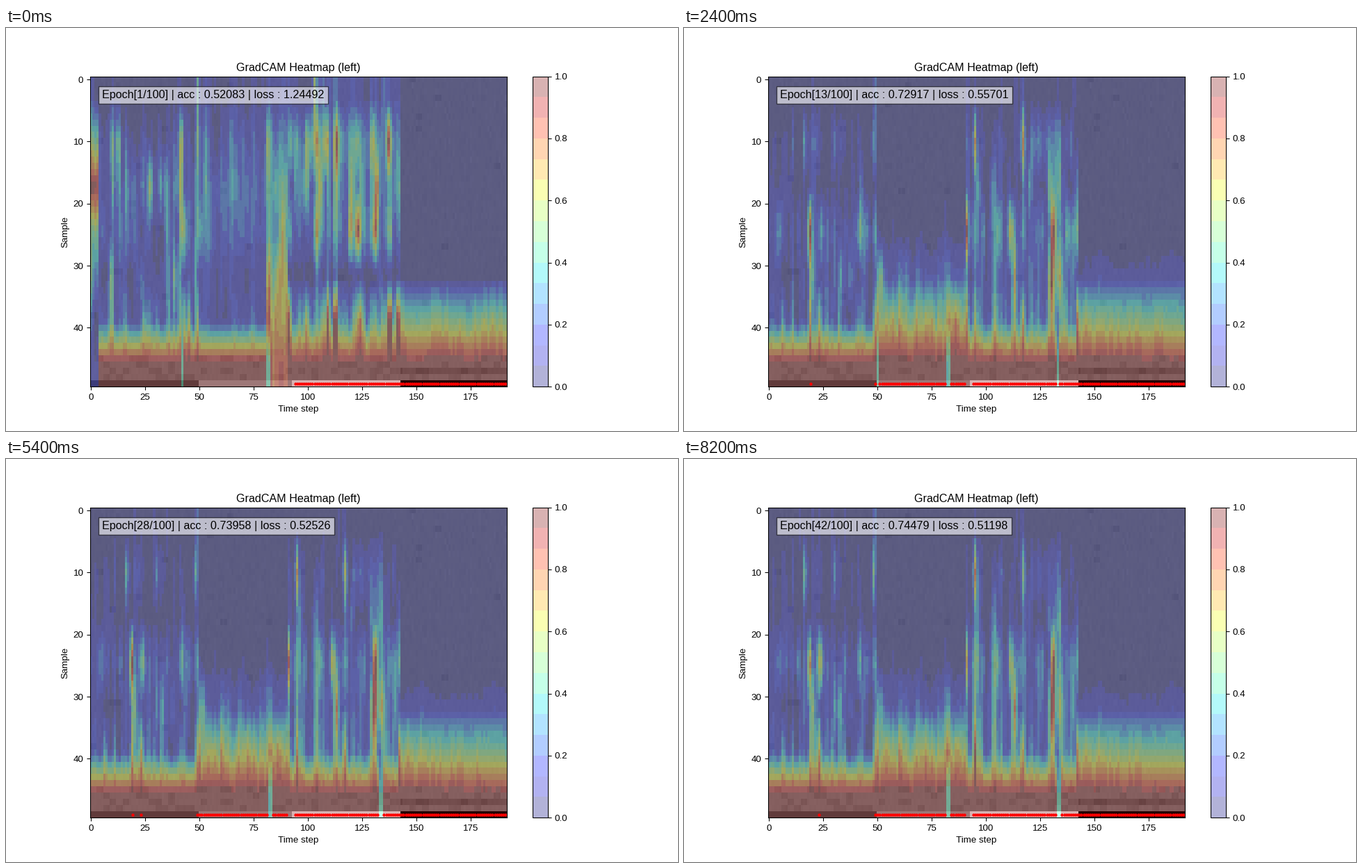
Write a matplotlib script that moves like this. It is 966x580 px and loops after 8400 ms.

```python
import numpy as np
import matplotlib.pyplot as plt
from matplotlib.animation import FuncAnimation

plt.rcParams["font.family"] = "Liberation Sans"

ROWS, COLS, CELLS, FRAMES = 50, 192, 7, 42
DPI = 96.6

# Training log: epoch, correct samples, loss
EPOCHS = (1, 6, 10, 17, 24, 32, 42)
HITS = (100, 143, 138, 142, 143, 141, 143)
LOSS = (1.24492, 0.74611, 0.58518, 0.51946, 0.52516, 0.52535, 0.51198)

# Settled mean activation of the vertical cells, top to bottom
CLASS_A = (.03, .10, .07, .20, .15, .21, 1)
CLASS_B = (.01, .02, .03, .05, .17, .55, 1)
CLASS_C = (.03, .15, .12, .36, .32, .38, 1)
CLASS_D = (.02, .02, .02, .02, .09, .50, 1)

# Segments: end column, first profile, settled profile, settling time, spread
SEGMENTS = [
    (4, (.15, .55, .97, .60, .40, .12, .15), CLASS_A, 1, .6),
    (50, (.06, .20, .30, .22, .20, .25, 1), CLASS_A, 5, .9),
    (81, (.08, .17, .26, .20, .12, .14, 1), CLASS_B, 1.2, .45),
    (91, (.10, .30, .45, .30, .55, .70, .85), CLASS_B, 1.2, .45),
    (143, (.18, .46, .42, .36, .05, .52, 1), CLASS_C, 7, .9),
    (COLS, (0, 0, 0, 0, .03, .50, 1), CLASS_D, 1, .15),
]

rng = np.random.default_rng(7)


def column_noise():
    """Unit noise per cell, shared in part by each whole column."""
    z = .8 * rng.standard_normal((CELLS, COLS)) + .6 * rng.standard_normal(COLS)
    z = z + .4 * (np.roll(z, 1, axis=1) + np.roll(z, -1, axis=1))
    return z / z.std()


FIRST, SETTLED, DRIFT = (column_noise() for _ in range(3))


def make_signal():
    """Grey sample image with the class labels in its last row."""
    runs = np.repeat(rng.standard_normal((ROWS, COLS // 3)), 3, axis=1)
    img = .513 + .006 * rng.standard_normal((ROWS, COLS)) - .035 * (runs > 2.2)
    img[45:] += .02 - .05 * (runs[45:] > .6)
    img[47, 143:] -= .1
    x = np.arange(COLS)
    img[-1] = np.select([x < 50, x < 93, x < 143], [1 / 3, 2 / 3, 1], 0)
    return img


def noise_at(epoch):
    """Noise that leaves its first state quickly and then drifts."""
    turn = .7 * epoch / FRAMES
    later = np.cos(turn) * SETTLED + np.sin(turn) * DRIFT
    w = np.exp((1 - epoch) / 3)
    return w * FIRST + np.sqrt(1 - w * w) * later


def activations(epoch):
    z = noise_at(epoch)
    cells = np.empty((CELLS, COLS))
    a = 0
    for b, first, last, tau, spread in SEGMENTS:
        w = np.exp((1 - epoch) / tau)
        mean = (w * np.array(first) + (1 - w) * np.array(last))[:, None]
        s = spread * (1 - mean)
        cells[:, a:b] = mean * np.exp(s * z[:, a:b] - s * s / 2)
        a = b
    # A few columns of the first three classes lose their foot
    cells[-1, :143] -= .6 * (z[-1, :143] > 2.1)
    return np.clip(cells, 0, 1)


def upsample(cells):
    """Linear interpolation from cells to rows."""
    pos = np.clip((np.arange(ROWS) + .5) * CELLS / ROWS - .5, 0, CELLS - 1)
    low = np.minimum(pos.astype(int), CELLS - 2)
    t = (pos - low)[:, None]
    return cells[low] * (1 - t) + cells[low + 1] * t


def correct(epoch, cells):
    """Columns whose class is predicted correctly."""
    x = np.arange(COLS)
    learned = epoch > 2
    first = (x < 50) & (cells[5] > .6) & learned
    second = (x >= 50) & (x < 91) & (cells[6] > .5) & learned
    third = (x >= 94) & ((cells[6] > .5) | ~np.bool_(learned))
    return x[first | second | third]


def caption(epoch):
    acc = round(np.interp(epoch, EPOCHS, HITS)) / COLS
    loss = np.interp(epoch, EPOCHS, LOSS)
    return f"Epoch[{epoch}/100] | acc : {acc:.5f} | loss : {loss:.5f}"


fig, ax = plt.subplots(figsize=(966 / DPI, 580 / DPI), dpi=DPI)
view = dict(vmin=0, vmax=1, aspect="auto", interpolation="nearest")
ax.imshow(make_signal(), cmap="gray", **view)
heat = ax.imshow(np.zeros((ROWS, COLS)), cmap=plt.get_cmap("jet", 15),
                 alpha=.3, **view)
fig.colorbar(heat, ax=ax)
dots, = ax.plot([], [], "r.", ms=4.5)
note = ax.text(5, 3, "", fontsize=12, bbox=dict(facecolor="white", alpha=.6))
ax.set(title="GradCAM Heatmap (left)", xlabel="Time step", ylabel="Sample",
       xlim=(-.5, COLS - .5), ylim=(ROWS - .5, -.5))


def update(i):
    epoch = i + 1
    cells = activations(epoch)
    heat.set_data(upsample(cells))
    x = correct(epoch, cells)
    dots.set_data(x, np.full(len(x), ROWS - 1))
    note.set_text(caption(epoch))
    return heat, dots, note


anim = FuncAnimation(fig, update, frames=FRAMES, interval=200, repeat=True)
plt.show()
```
